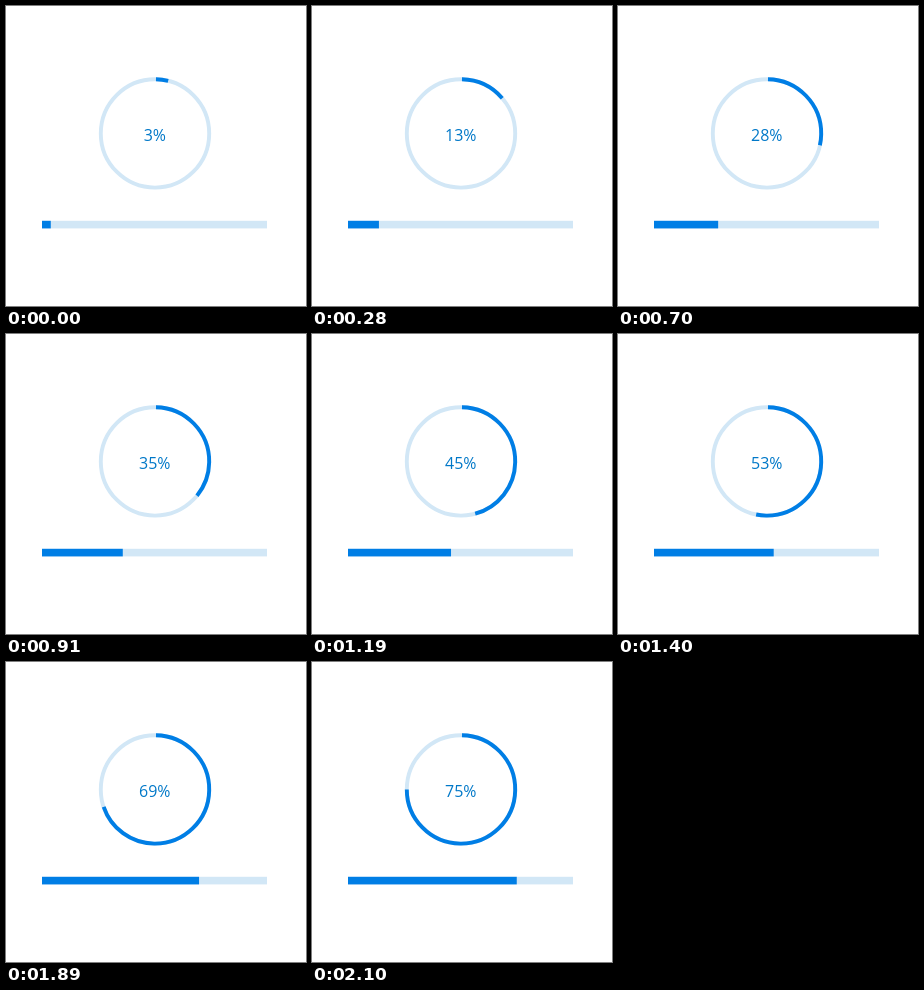
These frames come from a looping animation (300x300 px, 2170 ms). An HTML page with a canvas:

```html
<!DOCTYPE html>
<html lang="en">
<head>
<meta charset="utf-8">
<title>Progress</title>
<style>
html, body { margin: 0; width: 100%; height: 100%; overflow: hidden; background: #fff; }
canvas { display: block; width: 300px; height: 300px; }
</style>
</head>
<body>
<canvas id="stage" width="300" height="300"></canvas>
<script>
const ctx = document.getElementById('stage').getContext('2d');
const STEP = 70, LOOP = 2170, MAX = 75;
const TRACK = '#d2e7f6', FILL = '#007ee5', LABEL = '#0078c8';
const ring = { x: 149, y: 127.4, r: 54.2, width: 3.9 };
const bar = { x: 36, y: 214.8, w: 225, h: 7.6 };

// Nearly steady climb: [step, percent]
const pace = [[0, 3.9], [13, 35.9], [20, 53.2], [27, 69.8], [30, 77]];

function progress(step) {
  let i = 1;
  while (i < pace.length - 1 && step > pace[i][0]) i++;
  const [s0, p0] = pace[i - 1], [s1, p1] = pace[i];
  return Math.min(MAX, p0 + (p1 - p0) * (step - s0) / (s1 - s0));
}

function arc(color, from, to) {
  ctx.strokeStyle = color;
  ctx.lineWidth = ring.width;
  ctx.beginPath();
  ctx.arc(ring.x, ring.y, ring.r, from, to);
  ctx.stroke();
}

function strip(color, width) {
  ctx.fillStyle = color;
  ctx.fillRect(bar.x, bar.y, width, bar.h);
}

function draw(ms) {
  const value = progress(Math.floor((ms % LOOP) / STEP));
  const top = -Math.PI / 2;
  ctx.fillStyle = '#fff';
  ctx.fillRect(0, 0, 300, 300);

  arc(TRACK, 0, Math.PI * 2);
  arc(FILL, top + 0.018, top + Math.PI * 2 * value / 100);
  strip(TRACK, bar.w);
  strip(FILL, bar.w * value / 100);

  ctx.fillStyle = LABEL;
  ctx.font = '16px "Open Sans", "Noto Sans", sans-serif';
  ctx.textAlign = 'center';
  ctx.textBaseline = 'alphabetic';
  ctx.fillText(Math.floor(value) + '%', 148.8, 135);
}

const start = performance.now();
function tick() {
  draw(performance.now() - start);
  requestAnimationFrame(tick);
}
tick();
</script>
</body>
</html>
```
